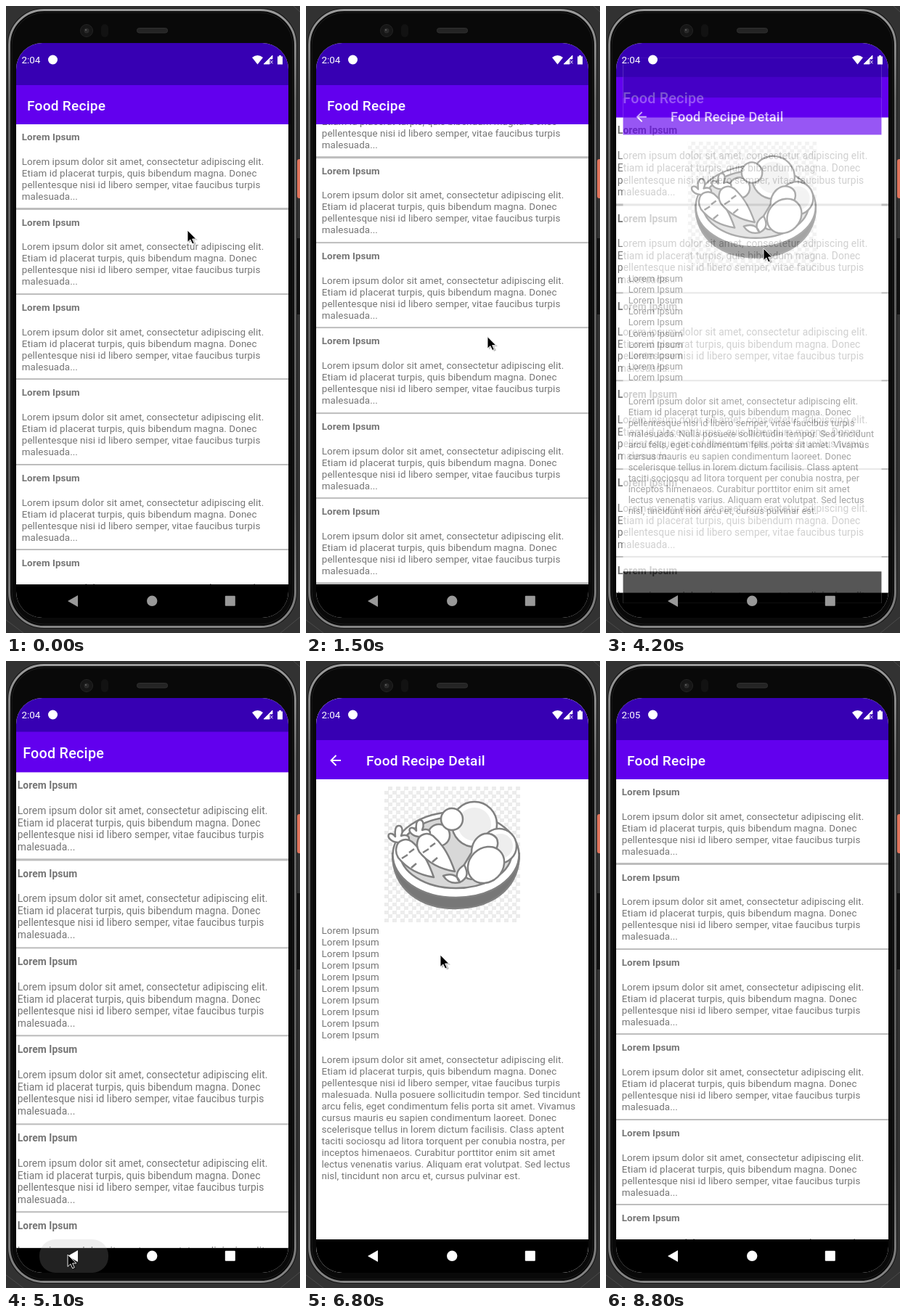
Write an HTML page that moves like this. It is 405 px wide and 864 px high and loops after 8900 ms.

```html
<!DOCTYPE html>
<html lang="en">
<head>
<meta charset="utf-8">
<title>Recipe list</title>
<style>
html, body { margin: 0; width: 100%; height: 100%; overflow: hidden; background: #323232; }
#stage { position: relative; width: 405px; height: 864px; overflow: hidden; font: 13.37px/16px Roboto, sans-serif; letter-spacing: .08px; color: #757575; white-space: nowrap; }
#stage > svg { position: absolute; left: 0; top: 0; }
.screen { position: absolute; left: 14px; top: 51px; width: 375px; height: 792px; border-radius: 36px; overflow: hidden; background: #000; }
.page { position: absolute; inset: 0; background: #fff; transform-origin: 187.5px 396px; }
.page > * { position: absolute; }
.status { left: 0; right: 0; top: 0; height: 59px; background: #3700b3; }
.bar { left: 0; right: 0; top: 58.4px; height: 54px; background: #6200ee; color: #fff; font: 500 19.1px/58px Roboto, sans-serif; letter-spacing: .0125em; }
.bar span { position: absolute; left: 15px; }
.bar .inner { left: 69px; }
.bar svg { position: absolute; left: 18.5px; top: 20px; }
.nav { left: 0; right: 0; top: 745.6px; bottom: 0; background: #000; }
.list { left: 0; right: 0; top: 112.4px; height: 634px; overflow: hidden; }
.row { position: relative; height: 117.4px; }
.row > * { position: absolute; left: 7.8px; }
.row b { top: 9.9px; }
.row p { margin: 0; top: 43.7px; }
.row i { left: 0; right: 0; top: 115px; height: 2.2px; background: #bdbdbd; }
.art { left: 93.5px; top: 122px; width: 187px; height: 187px; background: repeating-conic-gradient(#ececec 0 25%, #fff 0 50%) 0 0 / 11px 11px; }
.items { left: 7.5px; top: 313.4px; }
.text { left: 7.5px; top: 491px; }
</style>
</head>
<body>
<div id="stage">
  <svg width="405" height="864">
    <defs>
      <linearGradient id="rim" x2="0" y2="1">
        <stop stop-color="#9c9c9c"/><stop offset=".15" stop-color="#666"/>
        <stop offset=".8" stop-color="#585858"/><stop offset="1" stop-color="#858585"/>
      </linearGradient>
    </defs>
    <rect width="405" height="864" fill="#323232"/>
    <path d="M0 846 24 864M378 864 405 842M396 0 405 8" stroke="#4b4b4b"/>
    <path d="M400 320h5v105h-5z" fill="#121212"/>
    <rect x="401" y="211" width="10" height="54" rx="3" fill="#e0745c"/>
    <rect x="2" y="3" width="399" height="855" rx="50" fill="#151515"/>
    <rect x="4.5" y="5.5" width="394" height="850" rx="48" fill="#080808" stroke="url(#rim)" stroke-width="3"/>
    <rect x="8" y="9" width="387" height="843" rx="45" fill="#090909" stroke="#1d1d1d"/>
    <circle cx="111" cy="34" r="8.5" fill="#161616" stroke="#232323"/>
    <circle cx="111" cy="34" r="3.5" fill="#2b2b2b"/><circle cx="110" cy="33" r="1" fill="#666"/>
    <rect x="131" y="25" width="10" height="18" rx="5" fill="#121212"/>
    <rect x="180.5" y="30.5" width="42" height="6.5" rx="3" fill="#242424" stroke="#303030"/>
  </svg>

  <div class="screen">
    <div class="page" id="home">
      <div class="status"></div>
      <div class="list"><div id="rows"></div></div>
      <div class="bar"><span>Food Recipe</span></div>
      <div class="nav"></div>
    </div>
    <div class="page" id="detail">
      <div class="status"></div>
      <div class="bar">
        <svg width="16" height="16" fill="none" stroke="#fff" stroke-width="1.9"><path d="M15 8H2M8.5 1 1.5 8l7 7"/></svg>
        <span class="inner">Food Recipe Detail</span>
      </div>
      <svg class="art" viewBox="0 0 187 187" fill="#fff" stroke="#808080" stroke-width="2.5" stroke-linejoin="round">
        <path d="M11 92C11 142 50 168 98 168S186 142 186 92Z" fill="#777"/>
        <ellipse cx="98.500" cy="94" rx="87" ry="59"/>
        <ellipse cx="98.500" cy="91" rx="77" ry="49" fill="#d8d8d8"/>
        <circle cx="124" cy="52" r="31"/><circle cx="124" cy="52" r="23" fill="#eee" stroke="none"/>
        <circle cx="75" cy="67" r="15"/><circle cx="93" cy="45" r="15"/>
        <circle cx="158" cy="82" r="24"/><circle cx="160" cy="82" r="17" fill="#eee" stroke="none"/>
        <path d="M120 91c0-18 14-30 28-25 13 6 9 20-2 32l-18 27c-11 8-25-3-20-14z"/>
        <ellipse cx="140" cy="108" rx="27" ry="23" transform="rotate(-45 140 108)"/>
        <path d="M104 132c-9-10-2-19 6-24 5 10 6 18-6 24zM104 132c-13 3-19-3-23-9 11-4 20-1 23 9z"/>
        <g id="carrot"><path d="M18 77c-9-1-14-7-12-11 3-3 7 0 9 3-1-8 0-15 5-15s6 8 3 14c5-2 11-1 11 4s-8 7-16 5z"/>
          <path d="M17 82c2-8 13-12 21-6 15 13 23 29 30 49-19-3-37-12-49-27-3-5-4-10-2-16z"/>
          <path d="m24 99 8-5M37 112l7-6M41 86l-7 5" fill="none"/></g>
        <use href="#carrot" x="29" y="-8"/>
      </svg>
      <div class="items" id="items"></div>
      <div class="text" id="text"></div>
      <div class="nav"></div>
    </div>
  </div>

  <svg width="405" height="864" fill="#fff">
    <text id="clock" x="21.500" y="79" font-size="13.400" letter-spacing="0">2:04</text>
    <circle cx="64.500" cy="74" r="6.500"/>
    <path d="M339 71q7.500-6 15 0l-7.500 9.500z"/>
    <path d="M367 68v5h-4v7h-8zM364 75l3.500 4.500M367.500 75l-3.500 4.500" stroke="#fff" stroke-width=".8"/>
    <path d="M374 69.500h2v-1.500h3v1.500h2v11h-7z"/>
    <rect id="ripple" x="46" y="797" width="95" height="46" rx="22" fill="#aaa" fill-opacity=".2"/>
    <g id="keys"><path d="M85 820 99 812v16z"/><circle cx="201.200" cy="819.800" r="7.200"/><rect x="301.800" y="812.800" width="14" height="14" rx="1"/></g>
    <g id="cursor">
      <path d="M2 2v16l4-3.500 3 6 3-1.500-3-5.500h5z" fill="#000" opacity=".25"/>
      <path d="M0 0v16.500l3.900-3.600 2.800 6 2.600-1.200-2.700-5.700h5.200z" fill="#000" stroke="#fff" stroke-width=".9"/>
    </g>
  </svg>
</div>

<script>
const $ = id => document.getElementById(id);
const LOOP = 8900, STEP = 100, ROW = 117.4, FADE = 330;

const lorem = `Lorem ipsum dolor sit amet, consectetur adipiscing elit.
Etiam id placerat turpis, quis bibendum magna. Donec
pellentesque nisi id libero semper, vitae faucibus turpis
malesuada. Nulla posuere sollicitudin tempor. Sed tincidunt
arcu felis, eget condimentum felis porta sit amet. Vivamus
cursus mauris eu sapien condimentum laoreet. Donec
scelerisque tellus in lorem dictum facilisis. Class aptent
taciti sociosqu ad litora torquent per conubia nostra, per
inceptos himenaeos. Curabitur porttitor enim sit amet
lectus venenatis varius. Aliquam erat volutpat. Sed lectus
nisl, tincidunt non arcu et, cursus pulvinar est.`.split('\n');
const teaser = [...lorem.slice(0, 3), 'malesuada...'].join('<br>');

$('rows').innerHTML = `<div class="row"><b>Lorem Ipsum</b><p>${teaser}</p><i></i></div>`.repeat(7);
$('items').innerHTML = 'Lorem Ipsum<br>'.repeat(10);
$('text').innerHTML = lorem.join('<br>');

const ramp = (t, from, to) => Math.min(1, Math.max(0, (t - from) / (to - from)));
const easeOut = p => 1 - (1 - p) ** 3;

// Two drags up, a fling back to the top, then a short drag and its return.
const scrollAt = t => 313.8 * ramp(t, 900, 1900) + 240.2 * ramp(t, 2200, 2400)
  - 554 * easeOut(ramp(t, 3300, 3700)) + 43.4 * (ramp(t, 5700, 5800) - ramp(t, 8300, 8400));

// Pointer moves: from, to, x, y
const home = [250, 309];
const moves = [
  [0, 900, 250, 644], [900, 1900, 250, 330], [1900, 2200, 153, 800], [2200, 2400, 153, 559],
  [3300, 3700, 217, 334], [4500, 4600, 85, 818], [5200, 5500, 185, 499], [5700, 5800, 185, 456],
  [6000, 6300, 185, 405], [6900, 7300, 85, 818], [7500, 7600, 178, 503]
];
const pointerAt = t => moves.reduce(([x, y], [from, to, nx, ny]) => {
  const p = ramp(t, from, to);
  return [x + (nx - x) * p, y + (ny - y) * p];
}, home);

const opens = [4100, 6320], closes = [5000, 7580];
const latest = (times, t) => Math.max(-LOOP, ...times.filter(s => s <= t));

function pagesAt(t) {
  const opened = latest(opens, t), closed = latest(closes, t);
  const p = easeOut(ramp(t, Math.max(opened, closed), Math.max(opened, closed) + FADE));
  return opened > closed
    ? { back: 1 + .05 * p, front: .85 + .15 * p, alpha: p }
    : { back: 1.1 - .1 * p, front: 1 - .1 * p, alpha: Math.max(0, 1 - 2 * p) };
}

function draw(now) {
  const t = Math.floor(now % LOOP / STEP) * STEP;
  const { back, front, alpha } = pagesAt(t);
  const sinceBack = t - latest(closes, t);
  $('rows').style.transform = `translateY(${-(scrollAt(t) % ROW)}px)`;
  $('home').style.transform = `scale(${back})`;
  $('detail').style.transform = `scale(${front})`;
  $('detail').style.opacity = alpha;
  $('cursor').setAttribute('transform', `translate(${pointerAt(t)})`);
  $('cursor').style.display = t < 8800 ? '' : 'none';
  $('ripple').style.opacity = sinceBack > 0 && sinceBack < 150 ? 1 : 0;
  $('keys').setAttribute('fill', t > closes[0] ? '#fff' : '#999');
  $('clock').textContent = t < 8400 ? '2:04' : '2:05';
}

const start = performance.now();
function tick() {
  draw(performance.now() - start);
  requestAnimationFrame(tick);
}
tick();
</script>
</body>
</html>
```
